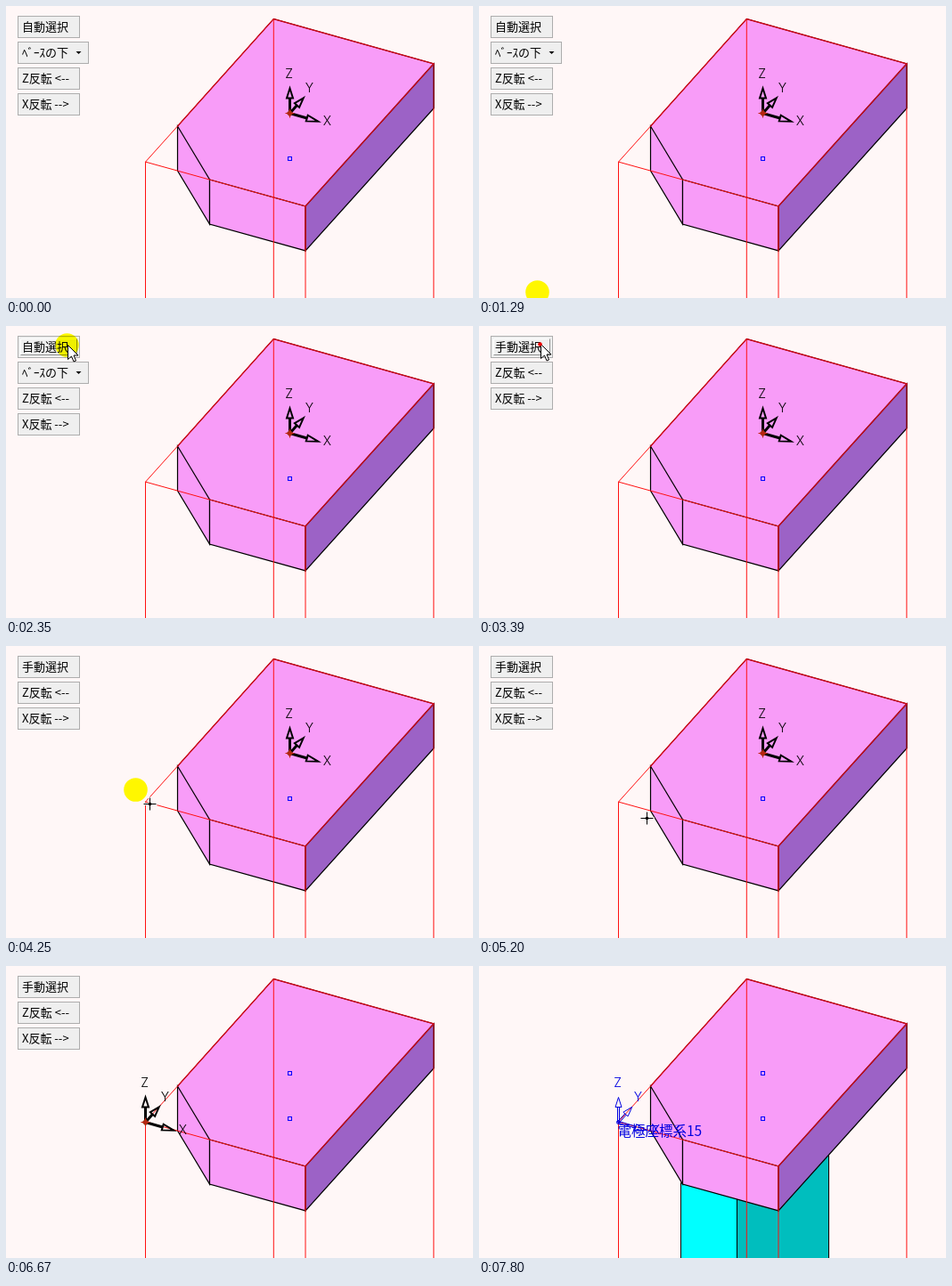
An HTML page with a canvas for the animation above (8000 ms loop, 524 by 328 pixels).

```html
<!DOCTYPE html>
<html lang="ja">
<head>
<meta charset="utf-8">
<style>
  html, body { margin: 0; width: 100%; height: 100%; overflow: hidden; background: #fff7f7; }
  canvas { display: block; }
</style>
</head>
<body>
<canvas id="stage" width="524" height="328"></canvas>
<script>
const ctx = document.getElementById('stage').getContext('2d');
const LOOP = 8000;
const BACK = '#fff7f7', RED = '#ff1010', PINK = '#f89cf8', PURPLE = '#9c62c6';
const JP = '"Noto Sans CJK JP", "Noto Sans CJK", sans-serif';

// Pointer path: time, x, y
const PATH = [
  [1290, 65, 321], [1500, 70, 230], [1680, 74, 135], [1830, 75, 71], [2070, 70, 31],
  [2380, 68, 20], [3890, 68, 20], [4070, 98, 80], [4250, 145, 161], [4400, 172, 177],
  [6280, 172, 177], [6370, 167, 172], [6500, 100, 150], [6670, -26, 121]
];

function pointerAt(t) {
  const i = PATH.findIndex(key => key[0] > t);
  if (i < 1) return null;
  const [t0, x0, y0] = PATH[i - 1], [t1, x1, y1] = PATH[i];
  const k = (t - t0) / (t1 - t0);
  return { x: Math.round(x0 + (x1 - x0) * k), y: Math.round(y0 + (y1 - y0) * k) };
}

function poly(points, { fill, stroke, width = 1, open = false }) {
  ctx.beginPath();
  points.forEach(([x, y]) => ctx.lineTo(x, y));
  if (!open) ctx.closePath();
  if (fill) { ctx.fillStyle = fill; ctx.fill(); }
  if (stroke) { ctx.strokeStyle = stroke; ctx.lineWidth = width; ctx.stroke(); }
}

const line = (points, stroke, width) => poly(points, { stroke, width, open: true });

function text(string, x, y, size, color, family = JP, align = 'left', weight = 400) {
  ctx.font = `${weight} ${size}px ${family}`;
  ctx.fillStyle = color;
  ctx.textAlign = align;
  ctx.textBaseline = 'alphabetic';
  ctx.fillText(string, x, y);
}

function dot(x, y, radius, color) {
  ctx.beginPath();
  ctx.arc(x, y, radius, 0, Math.PI * 2);
  ctx.fillStyle = color;
  ctx.fill();
}

function electrode() {
  poly([[226, 243], [289, 261], [289, 330], [226, 330]], { fill: '#00ffff', stroke: '#000' });
  poly([[289, 261], [336, 273], [392, 211], [392, 330], [289, 330]], { fill: '#00bebe', stroke: '#000' });
}

function block() {
  const back = [299.8, 14], right = [479.4, 64.4], front = [335.5, 224.4], left = [156, 174.6];
  const cutA = [192, 134.5], cutB = [228, 194.5];
  const down = ([x, y]) => [x, y + 50];
  const edge = { stroke: '#000', width: 1.2 };
  poly([back, right, front, cutB, cutA], { fill: PINK });
  poly([cutA, cutB, down(cutB), down(cutA)], { fill: PINK, ...edge });
  poly([cutB, front, down(front), down(cutB)], { fill: PINK, ...edge });
  poly([front, right, down(right), down(front)], { fill: PURPLE, ...edge });
  line([cutA, back, right], '#000');

  for (const [x, y] of [back, right, front, left]) line([[x, y], [x, 330]], RED);
  line([right, down(right)], '#6b1030');
  line([front, down(front)], '#c00818', 1.2);
  line([cutA, left, front], RED);
  line([cutA, back, right, front], '#d00818', 1.4);
}

function marker(x, y) {
  ctx.strokeStyle = '#0000ff';
  ctx.lineWidth = 1;
  ctx.strokeRect(x - 2, y - 2, 4, 4);
}

function arrow(dx, dy, length, shaft, color, thin) {
  const size = Math.hypot(dx, dy), ux = dx / size, uy = dy / size;
  const at = (along, side) => [ux * along - uy * side, uy * along + ux * side];
  if (thin) poly([at(0, -1), at(shaft, -1), at(shaft, 1), at(0, 1)], { stroke: color });
  else line([at(0, 0), at(shaft, 0)], color, 3);
  poly([at(length, 0), at(shaft, -3.5), at(shaft, 3.5)], { stroke: color, width: thin ? 1 : 2 });
}

function axes(x, y, color, thin) {
  ctx.save();
  ctx.translate(x, y);
  arrow(0, -1, 28, 17, color, thin);
  arrow(16, -18, 23, 12, color, thin);
  arrow(33, 9.5, 33, 20, color, thin);
  for (const [letter, lx, ly] of [['Z', -1, -40], ['Y', 22, -24], ['X', 42, 13]])
    text(letter, lx, ly, 14, color, 'Inter, sans-serif', 'center', 300);
  if (thin) {
    ctx.beginPath();
    ctx.arc(0, 0, 2, 0, Math.PI * 2);
    ctx.strokeStyle = color;
    ctx.stroke();
  } else {
    poly([[-4, 0], [0, -4], [4, 0], [0, 4]], { fill: '#a03010' });
    line([[-5, 0], [5, 0]], '#c02010');
    line([[0, -5], [0, 5]], '#c02010');
  }
  ctx.restore();
}

function button(label, row, hovered, combo) {
  const y = 11 + row * 29, width = combo ? 79 : 69;
  ctx.fillStyle = '#efefef';
  ctx.fillRect(13, y, width, 24);
  ctx.lineWidth = 1;
  ctx.strokeStyle = '#adadad';
  ctx.strokeRect(13, y, width, 24);
  if (hovered) {
    line([[16, y + 21], [16, y + 3], [79, y + 3]], '#fff');
    line([[16, y + 21], [79, y + 21], [79, y + 3]], '#909090');
  }
  text(label, 17.5, y + 16, 13, '#000');
  if (combo) poly([[78, y + 10.5], [84, y + 10.5], [81, y + 13.5]], { fill: '#000' });
}

function panel(t, pointer) {
  const manual = t >= 2640;
  const labels = [manual ? '手動選択' : '自動選択', 'Z反転 <--', 'X反転 -->'];
  if (t < 2700) labels.splice(1, 0, 'ﾍﾞｰｽの下');
  labels.forEach((label, row) => {
    const top = 11 + row * 29;
    const hovered = pointer && t < 4400 && pointer.x < 83 && pointer.y >= top && pointer.y < top + 25;
    button(label, row, hovered, label.endsWith('下'));
  });
}

function arrowCursor(x, y) {
  const shape = [[0, 0], [0, 16], [4, 12.5], [6.5, 18.5], [9, 17.5], [6.5, 11.5], [11.5, 11.5]];
  poly(shape.map(([dx, dy]) => [x + dx, y + dy]), { fill: '#fff', stroke: '#000' });
}

function crossCursor(x, y) {
  for (const [color, width, reach] of [[BACK, 3, 8], ['#000', 1, 7]]) {
    line([[x - reach, y], [x + reach, y]], color, width);
    line([[x, y - reach], [x, y + reach]], color, width);
  }
  ctx.strokeStyle = '#000';
  ctx.strokeRect(x - 1, y - 1, 2, 2);
}

function cursor(t, { x, y }) {
  if (t < 2380 || (t >= 3890 && t < 5200) || t >= 6400) {
    ctx.globalCompositeOperation = 'multiply';
    dot(x, y, 13.3, '#ffff00');
    ctx.globalCompositeOperation = 'source-over';
  }
  if (t < 4100 && y < 125) arrowCursor(x + 1, y);
  else crossCursor(x + 16, y + 16);
  if (t >= 3390 && t < 3890) dot(x, y, 2.3, '#f00000');
  if (t >= 6020 && t < 6400) dot(171, 178, 2.3, '#f00000');
}

function draw(t) {
  const pointer = pointerAt(t), placed = t >= 5500, done = t >= 7800;
  ctx.setTransform(1, 0, 0, 1, 0, 0);
  ctx.fillStyle = BACK;
  ctx.fillRect(0, 0, 524, 328);
  ctx.translate(.5, .5);
  if (done) electrode();
  block();
  marker(318, 171);
  if (placed) marker(318, 120);
  axes(placed ? 156 : 318, placed ? 175 : 120, done ? '#0000e0' : '#000', done);
  if (done) text('電極座標系15', 155, 190, 15.5, '#0000e0', JP, 'left', 300);
  else panel(t, pointer);
  if (pointer) cursor(t, pointer);
}

const start = performance.now();
function frame() {
  draw((performance.now() - start) % LOOP);
  requestAnimationFrame(frame);
}
frame();
</script>
</body>
</html>
```
